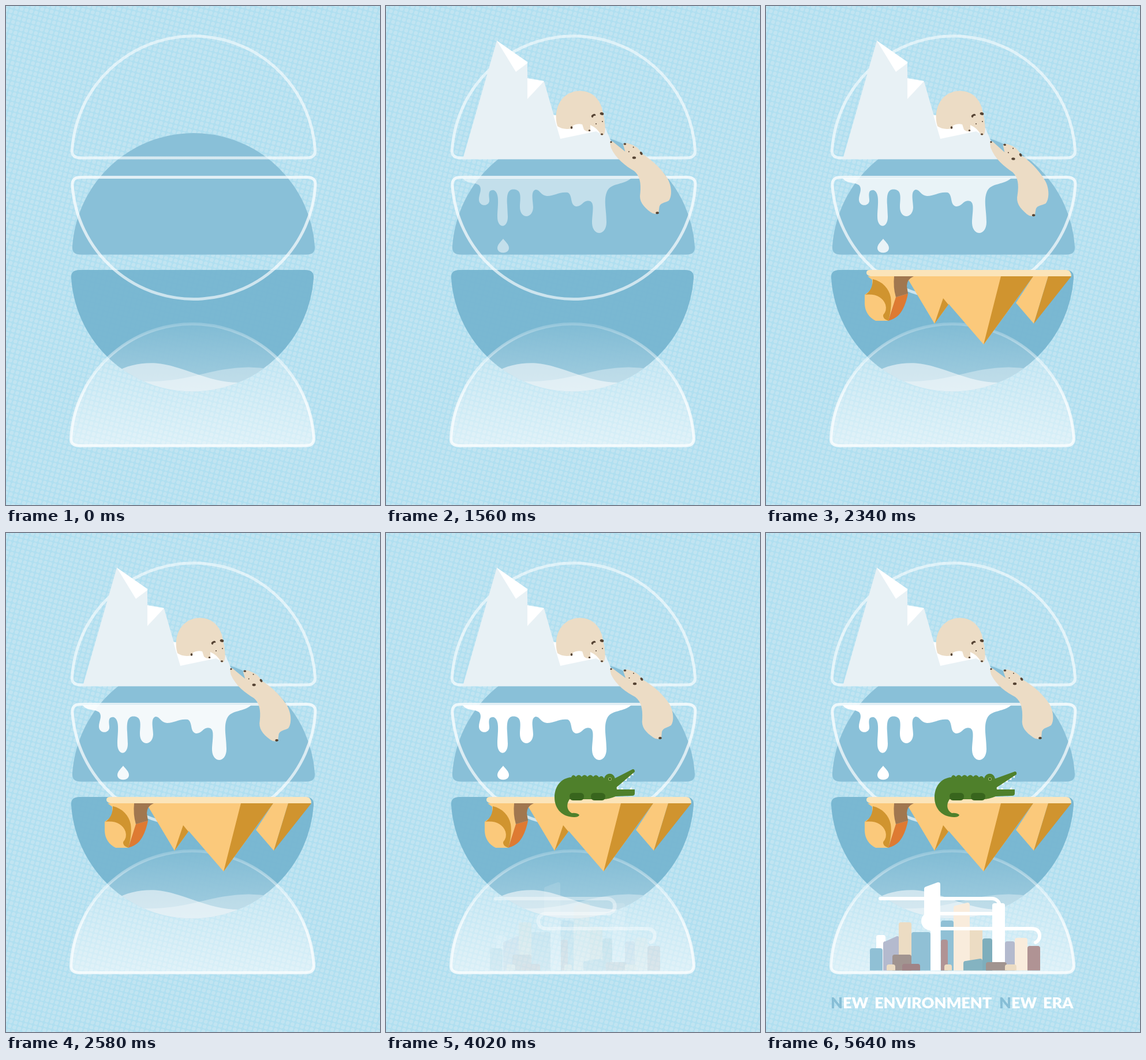
An HTML page with a canvas that plays this animation: 648x864 px, repeating every 6.34 s.

```html
<!DOCTYPE html>
<html lang="en">
<head>
<meta charset="utf-8">
<title>New Environment New Era</title>
<style>
html, body { margin: 0; width: 100%; height: 100%; overflow: hidden; background: #b1dff0; }
canvas { display: block; width: 648px; height: 864px; }
</style>
</head>
<body>
<canvas id="stage" width="648" height="864"></canvas>
<script>
const W = 648, H = 864, LOOP = 6340, STEP = 30;
const stage = document.getElementById('stage').getContext('2d');
const makeLayer = () => {
  const c = document.createElement('canvas');
  c.width = W;
  c.height = H;
  return c.getContext('2d');
};
const backdrop = makeLayer(), scratch = makeLayer();

const clamp = v => Math.max(0, Math.min(1, v));
const progress = (t, start, length) => clamp((t - start) / length);
const smooth = p => p * p * (3 - 2 * p);
const slowFade = p => Math.pow(p, 0.8);
// Two back-and-forth swings, resting at 0 before and after.
const swing = (t, start) => (1 - Math.cos(progress(t, start, 2100) * 4 * Math.PI)) / 2;

function fill(g, color, path) {
  g.fillStyle = color;
  g.fill(new Path2D(path));
}
function dot(g, color, x, y, rx, ry = rx, turn = 0) {
  g.fillStyle = color;
  g.beginPath();
  g.ellipse(x, y, rx, ry, turn, 0, 7);
  g.fill();
}
function fade(alpha, draw) {
  if (alpha <= 0) return;
  if (alpha >= 1) return draw(stage);
  scratch.clearRect(0, 0, W, H);
  draw(scratch);
  stage.globalAlpha = alpha;
  stage.drawImage(scratch.canvas, 0, 0);
  stage.globalAlpha = 1;
}

// Half disc with softened corners; side -1 is a dome, 1 a bowl.
function halfDisc(cx, y, r, side) {
  const a = 0.07, p = new Path2D();
  p.moveTo(cx - r + 15, y);
  p.quadraticCurveTo(cx - r - 1, y, cx - r * Math.cos(a), y + side * r * Math.sin(a));
  p.arc(cx, y, r, Math.PI - side * a, side < 0 ? -a : a, side > 0);
  p.quadraticCurveTo(cx + r + 1, y, cx + r - 15, y);
  p.closePath();
  return p;
}

function verticalFade(g, y0, a0, y1, a1) {
  const grad = g.createLinearGradient(0, y0, 0, y1);
  grad.addColorStop(0, `rgba(255,255,255,${a0})`);
  grad.addColorStop(1, `rgba(255,255,255,${a1})`);
  return grad;
}

function paintBackdrop(g) {
  g.fillStyle = '#b0dff0';
  g.fillRect(0, 0, W, H);
  g.save();
  g.translate(W / 2, H / 2);
  g.rotate(0.26);
  for (let x = -560; x < 560; x += 8.6)
    for (let y = -560; y < 560; y += 8.6) dot(g, '#c1e4f1', x, y, 3.5);
  g.restore();

  g.fillStyle = '#89c0d8';
  g.fill(halfDisc(325, 430.5, 210.5, -1));
  const bowl = halfDisc(323, 457, 210.5, 1);
  g.fillStyle = 'rgba(117,181,208,.92)';
  g.fill(bowl);

  g.lineWidth = 5;
  g.strokeStyle = verticalFade(g, 50, 0.55, 265, 0.65);
  g.stroke(halfDisc(325, 263, 211, -1));
  g.strokeStyle = verticalFade(g, 296, 0.75, 508, 0.62);
  g.stroke(halfDisc(325.5, 296.5, 211, 1));

  const dome = halfDisc(323, 761.5, 211, -1);
  g.fillStyle = verticalFade(g, 551, 0.06, 762, 0.52);
  g.fill(dome);
  g.save();
  g.clip(bowl);
  fill(g, 'rgba(255,255,255,.33)', 'M238 650C300 652 344 634 380 629Q420 622 460 629V680H238Z');
  fill(g, 'rgba(255,255,255,.55)', 'M190 634C210 622 234 617 260 618.500C306 622 352 654 408 652V680H190Z');
  g.restore();
  g.strokeStyle = verticalFade(g, 551, 0.2, 690, 0.75);
  g.stroke(dome);
}

function iceberg(g) {
  fill(g, '#e8f1f5', 'M192 60L245 97V126L274 131L302 228L364 215L380 211L389 232L404 265H133Z');
  fill(g, '#fff', 'M192 60L245 97V99L225 114ZM245 125L274 130L245 161ZM290 189L302 230L364 217L377 224L372 206L340 190Z');
}

const FUR = '#ecdcc5', BROWN = '#564434';
function sittingBear(g) {
  fill(g, FUR, 'M297 208C288 176 306 147 336 147C360 147 373 165 376 185C378 196 382 212 378 222Q374 227 370 219C365 212 360 209 354 206V215Q349 220 343 214L340 205Q331 203 324 207L322 212Q307 215 297 208Z');
  dot(g, BROWN, 359.500, 190, 4, 2.6, -0.5);
  dot(g, BROWN, 374, 186.500, 3.4, 2.4, 0.3);
  dot(g, FUR, 361, 192, 2.6, 1.8, -0.5);
  dot(g, BROWN, 364, 204, 1);
  dot(g, BROWN, 375, 200, 1);
  dot(g, BROWN, 374, 222, 2.2, 1.5);
  dot(g, BROWN, 321.500, 210.500, 1.8, 2.2);
  dot(g, BROWN, 352.500, 215.500, 1.8, 1.6);
}
function hangingBear(g, turn) {
  g.save();
  g.translate(390, 235);
  g.rotate(turn);
  g.translate(-390, -235);
  fill(g, FUR, 'M388 236Q391 232 396 237L415 251L411 239Q414 234 424 238C434 241 439 246 445 254C466 266 482 282 491 296C499 310 499 326 494 333C488 337 480 337 478 344L477 355Q470 359 463 354C450 345 442 336 444 322C445 304 442 292 432 284C417 276 399 264 390 245Z');
  dot(g, BROWN, 390, 235.500, 1.6);
  dot(g, BROWN, 414, 238, 2.3, 1.7);
  dot(g, BROWN, 443, 253, 2, 3, -0.6);
  dot(g, BROWN, 431, 261, 3.2, 2.2);
  dot(g, BROWN, 429, 243, 1);
  dot(g, BROWN, 421.500, 251, 1);
  dot(g, BROWN, 475, 355, 2.8, 2, -0.2);
  g.restore();
}

function drips(g) {
  fill(g, '#fff', 'M133 298H425C412 310 392 306 384 319C376 334 382 352 382 374C382 399 358 399 357 376C357 360 362 342 354 338C342 334 340 348 329 347C318 344 324 328 315 323C300 321 292 329 279 329C268 328 266 317 259 318C250 321 255 338 255 349C254 369 232 369 232 348C232 336 236 321 225 318C211 315 209 326 210 344L211 365C211 386 193 386 193 365C193 348 198 324 187 319C174 317 180 333 179 338C177 348 161 347 161 335C161 326 167 318 162 311C155 304 140 309 133 298Z');
  fill(g, '#fff', 'M203 403C207 408 213 413 213 419C213 430 193 430 193 419C193 413 199 408 203 403Z');
}

const SAND = '#fbc97b', SHADE = '#d0942f';
function desert(g) {
  fill(g, SAND, 'M243 468H320L316 517L292 550ZM275 468H463L377 586ZM433 514L463 468H489L464 550Z');
  fill(g, SHADE, 'M307 506L292 550L316 517ZM407 468H463L377 586ZM489 468H529L464 550Z');
  fill(g, SAND, 'M176 468H223L225 505L212 545H190Q172 536 171 516V500L184 490V474Z');
  fill(g, SHADE, 'M185 473C202 477 213 489 216 504C218 517 216 532 212 545Q202 542 203 535Q210 527 207 517C202 504 190 498 172 500Q185 492 185 473Z');
  fill(g, '#a1774f', 'M222 468H256Q244 473 244 485L246 498L225 504Q220 487 222 468Z');
  fill(g, '#de7a32', 'M225 504L246 498Q241 523 230 535Q223 542 212 545Z');
  fill(g, '#fbe4b9', 'M180 457H521Q529 458 529 468H181Q174 466 174 462Q174 457 180 457Z');
}

const GREEN = '#4f802b';
function crocodile(g, turn) {
  g.save();
  g.translate(396, 441);
  g.rotate(-turn);
  g.translate(-396, -441);
  fill(g, '#fff', 'M431 419L431 424L426 422L425 428L420 426L418 432L413 430L411 436L406 434L402 441L396 440L402 430Z');
  fill(g, GREEN, 'M384 428L398 425L431 413Q435 413 434 418L396 443L382 442Z');
  g.restore();

  fill(g, '#fff', 'M398 446L401 440L405 446L409 441L413 446ZM420 446L425 440L428 446Z');
  fill(g, GREEN, 'M335 488Q334 492 326 492C306 492 292 478 292 458C292 438 304 424 321 423Q324 416 329 422Q334 416 339 422Q344 416 349 422Q354 416 359 422Q364 416 369 423Q374 418 378 425C381 414 395 414 397 426L400 444H431V451Q431 455 426 455L398 456Q386 461 376 461H318C312 470 313 480 322 485Q330 484 335 488Z');
  fill(g, '#38651d', 'M324 450H338Q343 451 343 456Q343 463 337 463H324Q318 463 318 456Q318 450 324 450ZM361 450H374Q380 451 380 456Q380 463 374 463H361Q355 463 355 456Q355 450 361 450Z');
  dot(g, '#8fb265', 388, 426, 3);
  dot(g, '#2c4c18', 388, 426, 1.7);
}

const LILAC = '#b4bace', CREAM = '#ecdcc3', PEACH = '#f9ecdc', MAUVE = '#b09394', GREY = '#a19490', SKY = '#90c0d5';
// Left, right, top left, top right, colour
const towers = [
  [191, 207, 696, 696, '#fff'], [180, 202, 719, 719, SKY], [203, 231, 707, 698, LILAC],
  [230, 252, 674, 674, CREAM], [252, 285, 691, 691, SKY], [303, 325, 671, 671, SKY],
  [303, 315, 704, 704, MAUVE], [353, 375, 682, 682, CREAM], [325, 353, 645, 640, PEACH],
  [375, 392, 702, 702, '#7eaebc'], [414, 431, 707, 707, LILAC], [431, 453, 701, 701, PEACH],
  [453, 475, 715, 715, MAUVE], [392, 414, 641, 641, '#fff'], [219, 252, 730, 730, GREY],
  [209, 224, 747, 747, CREAM], [236, 267, 746, 746, '#a08487'], [309, 322, 747, 747, CREAM],
  [342, 375, 741, 737, '#84b3c1'], [381, 417, 743, 743, GREY], [414, 434, 747, 747, CREAM]
];
function city(g) {
  for (const [l, r, a, b, color] of towers)
    fill(g, color, `M${l} 757.500V${a + 4}Q${l} ${a} ${l + 4} ${a}L${r - 4} ${b}Q${r} ${b} ${r} ${b + 4}V757.500Z`);
  fill(g, '#fff', 'M274 616Q274 613 278 612L297 605Q302 604 302 609V757.500H285V690Q284 686 274 682Z');
}

function pipes(g, shift) {
  g.save();
  g.translate(shift, 0);
  g.strokeStyle = '#fff';
  g.lineWidth = 6;
  g.lineCap = 'round';
  g.stroke(new Path2D('M198 633H392A13 13 0 0 1 392 659H285A13 13 0 0 0 285 685H460Q474 685 474 698Q474 705 467 709'));
  g.restore();
}

function slogan(g) {
  g.font = '900 27px Lato, "Open Sans", sans-serif';
  const word = (text, x, color) => {
    g.fillStyle = color;
    g.fillText(text, x, 823);
  };
  for (const x of [112, 404]) {
    word('N', x, '#87bed6');
    word('EW', x + g.measureText('N').width, '#fff');
  }
  word('ENVIRONMENT', 188, '#fff');
  word('ERA', 480, '#fff');
}

function draw(t) {
  stage.drawImage(backdrop.canvas, 0, 0);
  fade(progress(t, 0, 560), g => {
    iceberg(g);
    sittingBear(g);
  });
  fade(slowFade(progress(t, 670, 2150)), drips);
  fade(progress(t, 0, 560), g => hangingBear(g, swing(t, 750) * 0.092));
  fade(progress(t, 1980, 360), desert);
  fade(progress(t, 2640, 360), g => crocodile(g, swing(t, 2640) * 0.175));
  fade(progress(t, 3960, 500), city);
  const flow = progress(t, 3330, 2160);
  fade(slowFade(flow), g => pipes(g, -11 * (1 - smooth(flow))));
  fade(progress(t, 5280, 330), slogan);
}

function tick(now) {
  draw(Math.floor((now % LOOP) / STEP) * STEP);
  requestAnimationFrame(tick);
}
paintBackdrop(backdrop);
draw(0);
requestAnimationFrame(tick);
</script>
</body>
</html>
```
